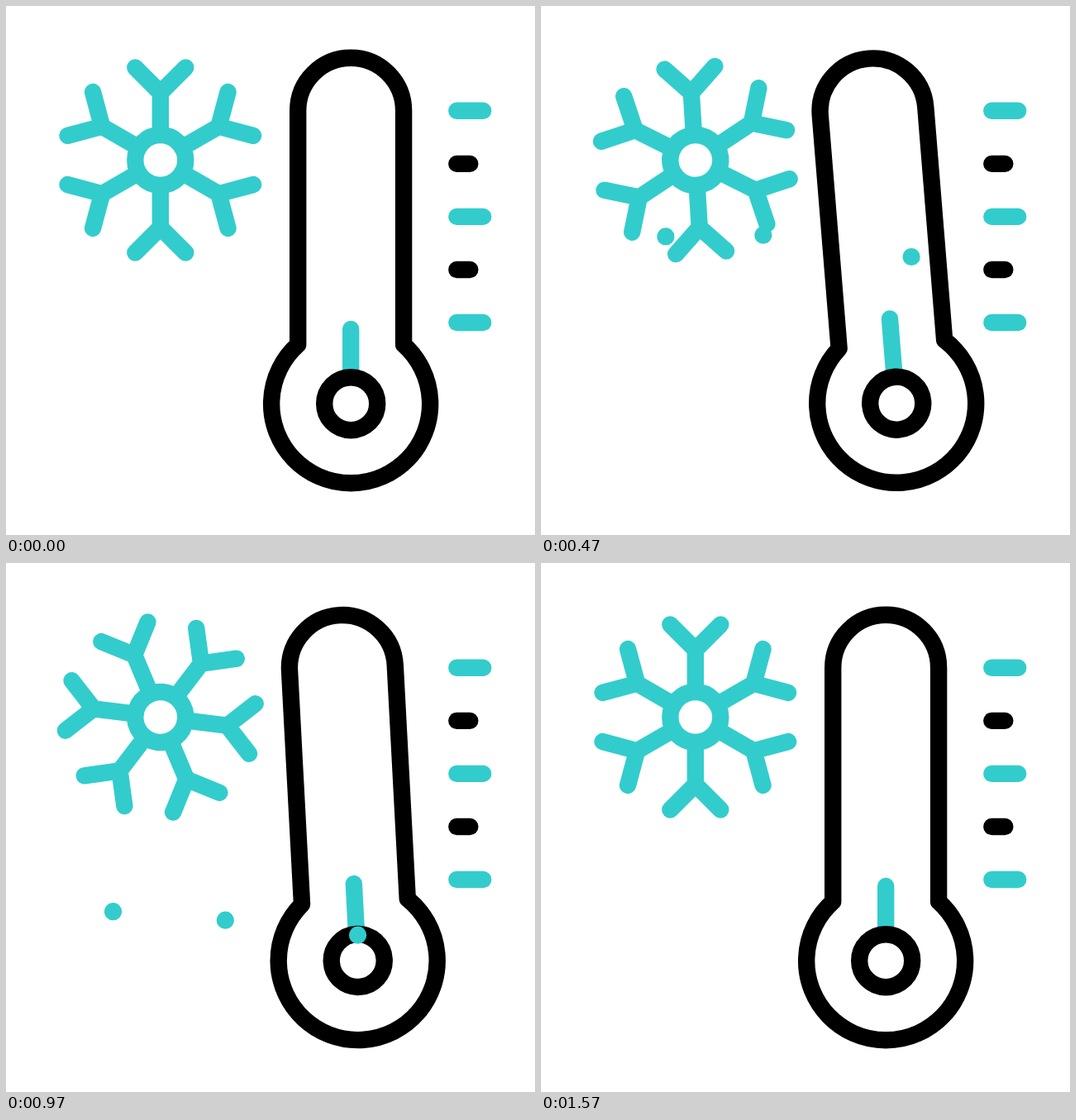
An HTML page that plays this animation: 640x640 px, repeating every 1670 ms.

```html
<!DOCTYPE html>
<html lang="en">
<head>
<meta charset="utf-8">
<title>Cold thermometer</title>
<style>
  html, body { margin: 0; width: 100%; height: 100%; overflow: hidden; background: #fff; }
  svg { display: block; width: 100%; height: 100%; }
  .line { fill: none; stroke-width: 20.4; stroke-linecap: round; stroke-linejoin: round; }
  .ice { stroke: #33cccc; }
  .ink { stroke: #000; }
  .dot { fill: #33cccc; }
</style>
</head>
<body>
<svg viewBox="0 0 640 640">
  <g id="ticks" class="line"></g>
  <g id="flake" class="line ice"><circle r="30.5"/></g>
  <g id="thermo" class="line">
    <path id="liquid" class="ice"/>
    <path class="ink" d="M353.2 409.7V126.7A63.95 63.95 0 0 1 481.1 126.7V409.7A96 96 0 1 1 353.2 409.7Z"/>
    <circle class="ink" cx="417.2" cy="481.2" r="32"/>
  </g>
  <g id="dots"></g>
</svg>
<script>
const LOOP = 1670, STEP = 100 / 3, LAST = 47;
const el = id => document.getElementById(id);
const clamp = v => Math.min(1, Math.max(0, v));

function add(parent, tag, attrs) {
  const node = document.createElementNS("http://www.w3.org/2000/svg", tag);
  for (const name in attrs) node.setAttribute(name, attrs[name]);
  return el(parent).appendChild(node);
}

for (let i = 0; i < 5; i++) {
  const minor = i % 2;
  add("ticks", "path", { class: minor ? "ink" : "ice", d: `M545.3 ${126.8 + 64.05 * i}h${minor ? 16 : 31.9}` });
}
for (let a = 0; a < 360; a += 60)
  add("flake", "path", { d: "M0-30.5V-81.5M-30.5-112L0-81.5L30.5-112", transform: `rotate(${a})` });

// Keys are [step, value] pairs.
const tilt = [[0, 0], [10.8, -12.96], [18.58, 7.27], [27, -4.05], [35, 0]];
const level = [[0, 391], [9.2, 362], [17.6, 391], [23.3, 368], [29.8, 391]];
const spin = [[0, 0], [10, -35.75], [23, -161.1], [29, -262.8], [35, -320.6], [47, -360]];

// A drop falls fast until "settle", sways around x and is gone at "end".
const drops = [
  { x: 131.3, y: 152, crest: 15.75, settle: 17.3, end: 41 },
  { x: 285.3, y: 162.5, crest: 20.25, settle: 21.2, end: 43 },
  { x: 436.8, y: 180.5, crest: 17.2, settle: 18.9, end: 45 }
];
for (const d of drops) d.node = add("dots", "circle", { class: "dot", r: 10.6 });

function span(keys, t) {
  let i = 0;
  while (i < keys.length - 2 && t > keys[i + 1][0]) i++;
  const a = keys[i][0], b = keys[i + 1][0];
  return [i, clamp((t - a) / (b - a))];
}

function linear(keys, t) {
  const [i, u] = span(keys, t);
  return keys[i][1] + (keys[i + 1][1] - keys[i][1]) * u;
}

function slope(keys, i) {
  if (i === 0 || i === keys.length - 1) return 0;
  const [p, q, r] = keys.slice(i - 1, i + 2);
  const h = q[0] - p[0], k = r[0] - q[0];
  return (k * (q[1] - p[1]) / h + h * (r[1] - q[1]) / k) / (h + k);
}

// Hermite curve, at rest at both ends
function smooth(keys, t) {
  const [i, u] = span(keys, t);
  const h = keys[i + 1][0] - keys[i][0], v = 1 - u;
  return keys[i][1] * v * v * (1 + 2 * u) + keys[i + 1][1] * u * u * (3 - 2 * u)
    + h * u * v * (slope(keys, i) * v - slope(keys, i + 1) * u);
}

function moveDrop(d, t) {
  const rush = Math.max(0, d.settle - t);
  const sway = (20 + 1.2 * rush) * Math.cos((t - d.crest) * Math.PI / 9);
  d.node.setAttribute("cx", d.x + sway);
  d.node.setAttribute("cy", d.y + 9.3 * t - 0.3 * rush * rush);
  d.node.setAttribute("opacity", clamp((t - d.settle + 15.2) / 5) * clamp((d.end - t) / 7));
}

function draw(ms) {
  const t = Math.min(LAST, Math.floor((ms % LOOP + 4) / STEP));
  el("flake").setAttribute("transform", `translate(186.8 186.5) rotate(${smooth(spin, t)})`);
  el("thermo").setAttribute("transform", `rotate(${linear(tilt, t)} 417.2 320)`);
  el("liquid").setAttribute("d", `M417.2 ${linear(level, t)}V445`);
  for (const d of drops) moveDrop(d, t);
}

let start;
function tick(now) {
  if (start === undefined) start = now;
  draw(Math.max(0, now - start));
  requestAnimationFrame(tick);
}
draw(0);
requestAnimationFrame(tick);
</script>
</body>
</html>
```
